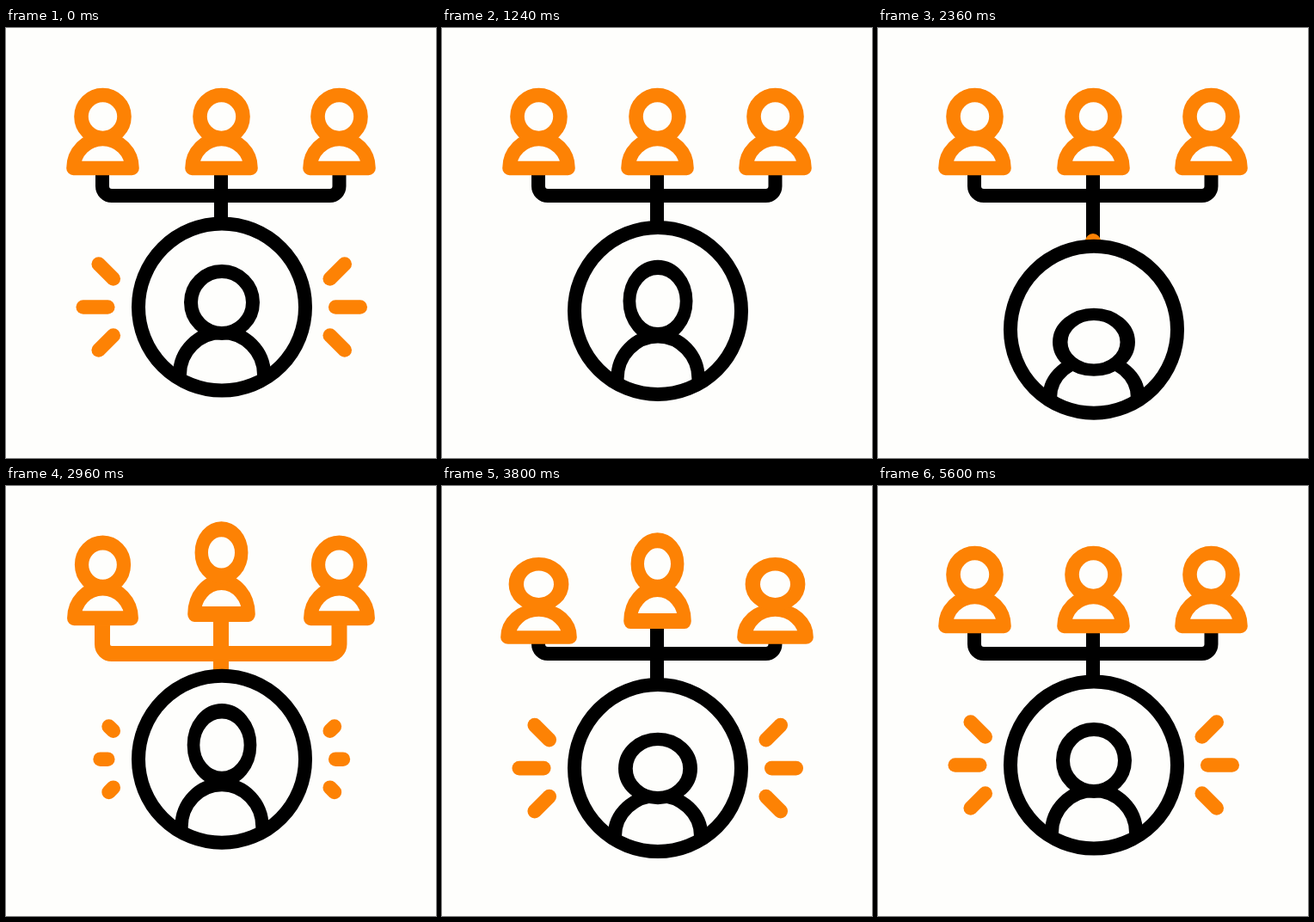
Recreate the animation shown at these times as an HTML page with a canvas. Size 500 by 500 pixels, loop 6040 ms.

```html
<!DOCTYPE html>
<html lang="en">
<head>
<meta charset="utf-8">
<title>Team leader</title>
<style>
  html, body { margin: 0; width: 100%; height: 100%; overflow: hidden; background: #fefefc; }
  canvas { display: block; width: 500px; height: 500px; }
</style>
</head>
<body>
<canvas id="stage"></canvas>
<script>
const LOOP = 6040, ORANGE = '#fd8204', BLACK = '#000', PAPER = '#fefefc';
const CX = 251, REST_Y = 324.5, RING = 97, BASE = 163, STEM_X = 250, BAR_Y = 195;

const canvas = document.getElementById('stage');
const ctx = canvas.getContext('2d');
const dpr = window.devicePixelRatio || 1;
canvas.width = canvas.height = 500 * dpr;

// Turning points of each bounce: time, vertical shift
const LEADER = [
  [420, 0], [850, -15.5], [1620, 23.5], [2000, -9.5],
  [2340, 26.5], [2720, -15], [3400, 14.5], [4000, 0]
];
const hop = (...times) => times.map((time, i) => [time, [0, -19, 13, -8, 0][i]]);
const MIDDLE = hop(2720, 3086, 3430, 3895, 4500);
const SIDES = hop(2870, 3056, 3790, 4548, 5100);

const clamp = (x, low = 0, high = 1) => Math.min(high, Math.max(low, x));
const progress = (t, from, to) => clamp((t - from) / (to - from));
const ease = x => x * x * (3 - 2 * x);

// Half a cosine wave from one turning point to the next
function swing(turns, t) {
  const i = turns.findIndex(turn => turn[0] > t);
  if (i < 1) return { y: 0, speed: 0 };
  const [t0, y0] = turns[i - 1], [t1, y1] = turns[i];
  const angle = Math.PI * (t - t0) / (t1 - t0);
  return {
    y: y0 + (y1 - y0) * (1 - Math.cos(angle)) / 2,
    speed: (y1 - y0) * Math.PI / 2 / (t1 - t0) * Math.sin(angle)
  };
}

// The head trails behind: stretched when falling, squashed at the bottom
function leaderPose(t) {
  const { y, speed } = swing(LEADER, t);
  const k = clamp(1.25 * speed - .0024 * y, -.1, .1);
  return { y, k, head: .43 * y - 88 * k };
}

// Stretched above the rest height, squashed below it
function memberPose(turns, t) {
  const { y } = swing(turns, t);
  const build = ease(progress(t, turns[0][0], turns[0][0] + 260));
  return {
    y,
    k: build * clamp(-.015 * y, -.06, .09),
    head: build * Math.max(-8, -.032 * y * y)
  };
}

function pen(color, width, cap = 'butt') {
  ctx.strokeStyle = color;
  ctx.lineWidth = width;
  ctx.lineCap = cap;
  ctx.lineJoin = 'round';
}

function shape(x, y, sx, sy, path, filled = true) {
  ctx.save();
  ctx.translate(x, y);
  ctx.scale(sx, sy);
  ctx.beginPath();
  path();
  ctx.fillStyle = PAPER;
  if (filled) ctx.fill();
  ctx.stroke();
  ctx.restore();
}

const disc = r => () => ctx.arc(0, 0, r, 0, 2 * Math.PI);

function member(x, p) {
  const sx = 1 - .8 * p.k, sy = 1 + p.k, y = BASE + p.y;
  pen(ORANGE, 16.6);
  shape(x, y, sx, sy, () => {
    ctx.arc(0, 0, 34, Math.PI, 0);
    ctx.closePath();
  });
  shape(x, y - 60 * sy + p.head, sx, sy, disc(25));
}

function leader(p) {
  const y = REST_Y + p.y;
  pen(BLACK, 16);
  ctx.save();
  ctx.beginPath();
  ctx.arc(CX, y, RING, 0, 2 * Math.PI);
  ctx.clip();
  shape(CX, y + 78.5, 1 - .45 * p.k, 1 + Math.min(0, p.k), () => {
    ctx.moveTo(-49, 30);
    ctx.arc(0, 0, 49, Math.PI, 0);
    ctx.lineTo(49, 30);
  });
  ctx.restore();
  shape(CX, y - 5.5 + p.head, 1 - .9 * p.k, 1 + p.k, disc(36));
  shape(CX, y, 1, 1, disc(RING), false);
}

function drawWires(bottom, midTop, sideTop) {
  ctx.beginPath();
  ctx.moveTo(STEM_X, bottom);
  ctx.lineTo(STEM_X, midTop);
  for (const x of [112, 387.5]) {
    ctx.moveTo(STEM_X, bottom);
    ctx.lineTo(STEM_X, BAR_Y);
    ctx.arcTo(x, BAR_Y, x, sideTop, 11);
    ctx.lineTo(x, sideTop);
  }
  ctx.stroke();
}

function rays(y, from, to) {
  if (to - from < .005) return;
  pen(ORANGE, 16.6, 'round');
  for (const side of [-1, 1]) {
    for (const row of [-1, 0, 1]) {
      const inner = row ? 126 : 132.5, length = row ? 17 : 28.5;
      const at = u => [250.75 + side * (inner + length * u), y + row * (33 + 17 * u)];
      ctx.beginPath();
      ctx.moveTo(...at(from));
      ctx.lineTo(...at(to));
      ctx.stroke();
    }
  }
}

function draw(t) {
  ctx.setTransform(dpr, 0, 0, dpr, 0, 0);
  ctx.fillStyle = PAPER;
  ctx.fillRect(0, 0, 500, 500);

  const main = leaderPose(t), mid = memberPose(MIDDLE, t), side = memberPose(SIDES, t);
  const y = REST_Y + main.y;
  const ends = [y - RING - 3, BASE + mid.y, BASE + side.y];

  pen(BLACK, 16);
  drawWires(...ends);

  // An orange pulse runs up from the leader to the members
  const front = 250 * Math.pow(progress(t, 2335, 2880), 1.5);
  const tail = 250 * ease(progress(t, 3050, 3600));
  if (front > tail) {
    pen(ORANGE, 18, 'round');
    ctx.setLineDash([front - tail, 2000]);
    ctx.lineDashOffset = -tail;
    drawWires(...ends);
    ctx.setLineDash([]);
  }

  member(112.5, side);
  member(250.5, mid);
  member(387.5, side);

  if (t < 2000) rays(y, ease(progress(t, 980, 1220)), 1);
  else rays(y, 0, ease(progress(t, 2835, 3180)));
  leader(main);
}

function tick(now) {
  draw(now % LOOP);
  requestAnimationFrame(tick);
}

draw(0);
requestAnimationFrame(tick);
</script>
</body>
</html>
```
